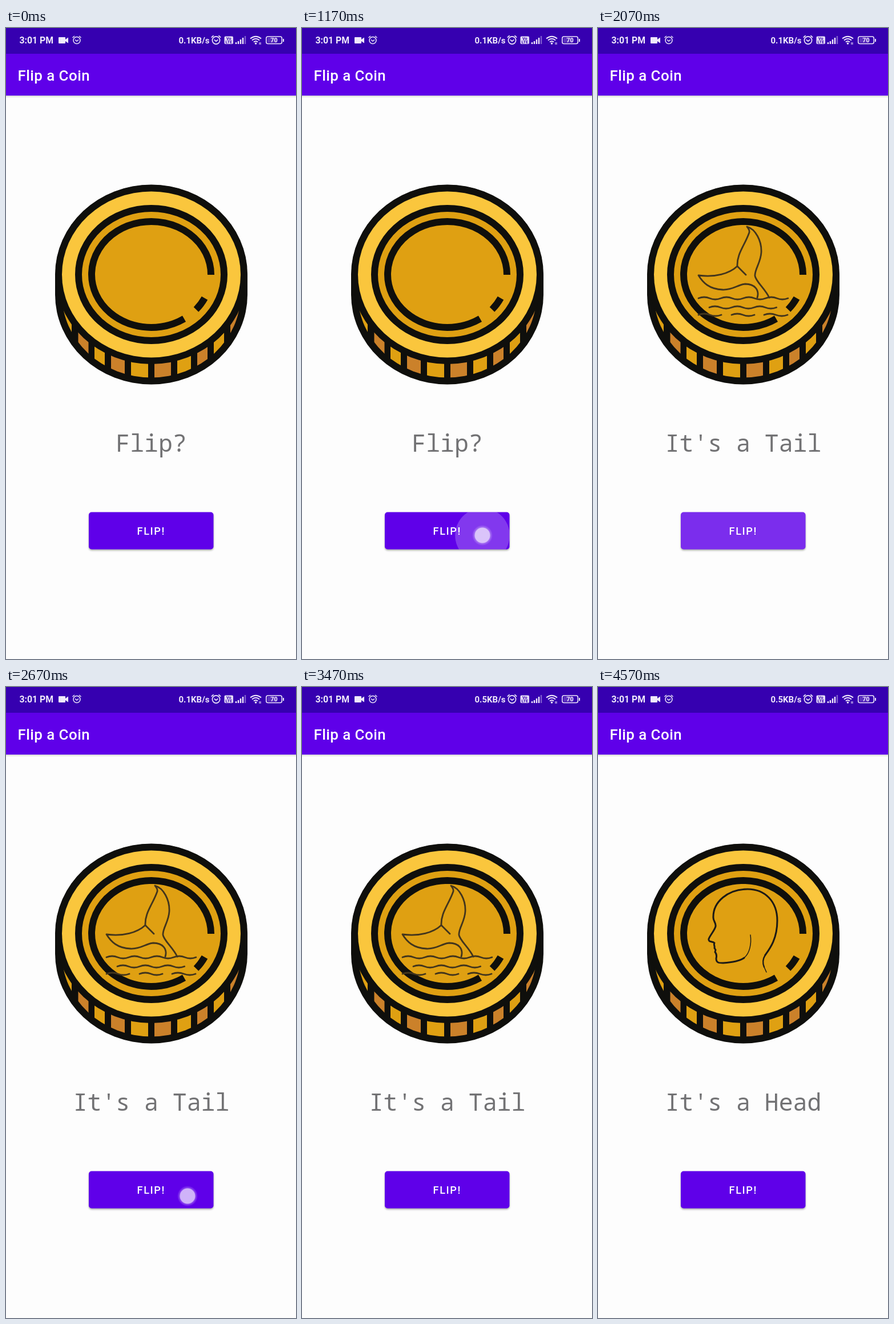
An HTML page that plays this animation: 508 by 1102 pixels, repeating every 4610 ms.

```html
<!DOCTYPE html>
<html lang="en">
<head>
<meta charset="utf-8">
<title>Flip a Coin</title>
<style>
  html, body { margin: 0; width: 100%; height: 100%; overflow: hidden; background: #fdfdfd; }
  svg { display: block; width: 100%; height: 100%; }
  text { font-family: Roboto, sans-serif; fill: #fff; }
  .status { fill: #f0eafb; font-weight: 700; }
  .line { fill: none; stroke: #f0eafb; }
  .ink { fill: none; stroke: #0f0f0c; stroke-width: 12; }
  .art { fill: none; stroke-linecap: round; stroke-linejoin: round; }
  #result { font: 41.47px "Noto Sans Mono", monospace; fill: #727274; text-anchor: middle; }
  #button { filter: drop-shadow(0 2px 1.5px rgba(0, 0, 0, .32)); }
</style>
</head>
<body>
<svg viewBox="0 0 508 1102">
  <defs>
    <clipPath id="edgeClip"><ellipse cx="254.5" cy="465.5" rx="156.5" ry="145"/></clipPath>
    <clipPath id="buttonClip"><rect x="145" y="845.5" width="218.5" height="65" rx="5"/></clipPath>
    <linearGradient id="barShadow" x2="0" y2="1">
      <stop stop-color="#000" stop-opacity=".16"/><stop offset="1" stop-color="#000" stop-opacity="0"/>
    </linearGradient>
    <radialGradient id="glow">
      <stop offset=".68" stop-color="#fff" stop-opacity=".4"/><stop offset="1" stop-color="#fff" stop-opacity="0"/>
    </radialGradient>
    <g id="alarm" class="line" stroke-width="1.5">
      <circle r="6"/>
      <path d="M-3-1 0 1.5 3-1M-7.500-4.500-4-7.500M7.500-4.500 4-7.500"/>
    </g>
  </defs>

  <rect width="508" height="1102" fill="#fdfdfd"/>
  <rect width="508" height="46" fill="#3600b0"/>
  <rect y="45" width="508" height="73" fill="#5f00e9"/>
  <rect y="118" width="508" height="4" fill="url(#barShadow)"/>
  <text x="20.500" y="91.500" font-size="25.900" font-weight="500" letter-spacing=".45">Flip a Coin</text>

  <!-- status bar -->
  <text class="status" x="23.500" y="27.300" font-size="15.800">3:01 PM</text>
  <text class="status" id="speed" x="302.500" y="27.300" font-size="15"></text>
  <path fill="#f0eafb" d="M93 16h10q1 0 1 1v3l5-3.500v10l-5-3.500v3q0 1-1 1H93q-1 0-1-1v-9q0-1 1-1z"/>
  <use href="#alarm" x="124" y="21.500"/>
  <use href="#alarm" x="368" y="21.500" transform="translate(-36.800 -2.150) scale(1.100)"/>
  <rect x="382.500" y="14.500" width="15.500" height="13.500" rx="2" fill="#e4dcf6"/>
  <g font-size="7" font-weight="700" text-anchor="middle">
    <text x="390.200" y="20.800" style="fill:#3600b0">Vo</text>
    <text x="390.200" y="27.200" style="fill:#3600b0">LTE</text>
  </g>
  <path class="line" stroke-width="2.400" d="M403 28v-3M407 28v-5M411 28v-8M415 28v-11"/>
  <path class="line" stroke-width="2.400" opacity=".4" d="M419 28V14"/>
  <path class="line" stroke-width="2" d="M428 18.500Q437.500 11 447 18.500M431 21.500Q437.500 16 444 21.500M434 24.500Q437.500 21.500 441 24.500"/>
  <circle cx="437.500" cy="27" r="1.800" fill="#f0eafb"/>
  <path class="line" stroke-width="1" d="M444 25v4M446 25v4"/>
  <rect class="line" stroke-width="1.600" x="455.800" y="15" width="27.500" height="12.500" rx="3"/>
  <rect x="458" y="17" width="16" height="8.500" fill="#fff" opacity=".2"/>
  <path class="line" stroke-width="2" d="M486 19v5"/>
  <text class="status" x="469.500" y="25.200" font-size="11" text-anchor="middle">70</text>

  <!-- coin -->
  <path fill="#0f0f0c" d="M86 430.500a168.500 157 0 0 1 337 0v35a168.500 157 0 0 1-337 0z"/>
  <g id="cells" clip-path="url(#edgeClip)"></g>
  <ellipse cx="254.500" cy="430.500" rx="168" ry="156.500" fill="#0f0f0c"/>
  <ellipse cx="254.500" cy="430.500" rx="156.500" ry="145" fill="#fac63d"/>
  <ellipse class="ink" cx="254.500" cy="430.500" rx="127.500" ry="115.500" style="fill:#dfa012"/>
  <path class="ink" d="M359 431A104.500 92.500 0 1 0 312 507.700M333 491.600A104.500 92.500 0 0 0 348 471.800"/>

  <g id="head" class="art" stroke="#1c1a16" stroke-width="3">
    <path d="M293 468C301 457 314 440 314 408C314 374 292 353 262 353C228 353 201 375 202 403C202 409 207 412 206 418C205 424 196 434 194 440C193 446 201 444 204 447C202 450 205 452 204 456L206 459L205 463C208 466 208 470 207 474C207 482 212 482 219 482C236 481 248 479 256 473"/>
    <path stroke-width="2.400" d="M293 468C288 476 288 482 291 489"/>
    <path stroke-width="1.500" d="M291 489L295 498M256 473C266 465 269 448 267 433"/>
  </g>
  <g id="tail" class="art" stroke="#42351d" stroke-width="2.800">
    <path d="M259 431L244 416C243 394 257 380 265 357C266 352 263 350 261 347C276 351 287 372 286 392C285 410 274 422 275 433C276 442 293 456 300 471"/>
    <path d="M244 416C230 429 205 436 176 432C184 445 195 456 218 457C236 458 245 448 258 447C275 447 283 458 279 471"/>
    <path d="M176 472q10-4 19.600 0t19.600 0 19.600 0 19.600 0 19.600 0 19.600 0 19.600 0 19.600 0M195 488q10-4 19.600 0t19.600 0 19.600 0 19.600 0 19.600 0 19.600 0M176 501q10-4 20 0t20 0M234 501q10-4 20 0t20 0M291 501q10-4 20.500 0t20.500 0"/>
  </g>

  <text id="result" x="254.500" y="740"></text>

  <rect id="button" x="145" y="845.500" width="218.500" height="65" rx="5" fill="#5f00e9"/>
  <g clip-path="url(#buttonClip)"><circle id="ripple" fill="#fff"/></g>
  <text x="229.600" y="885.300" font-size="18.140" font-weight="500" letter-spacing="1.620">FLIP!</text>
  <g id="touch">
    <circle r="18" fill="url(#glow)"/>
    <circle r="13.500" fill="#fff" opacity=".5"/>
  </g>
</svg>

<script>
const LOOP = 4610, RELEASE = 110, FLIP_DELAY = 130;
const taps = [
  { at: 1100, x: 316, y: 886, side: 'Head' },
  { at: 1830, x: 316, y: 886, side: 'Tail' },
  { at: 2640, x: 318, y: 889, side: 'Tail' },
  { at: 3730, x: 313, y: 883, side: 'Head' },
];
const $ = id => document.getElementById(id);
const ramp = (t, from, to) => Math.min(1, Math.max(0, (t - from) / (to - from)));
const setText = (id, value) => { if ($(id).textContent !== value) $(id).textContent = value; };
const show = (id, visible) => $(id).setAttribute('visibility', visible ? 'visible' : 'hidden');

const cells = [[97, 115], [126.5, 144.5], [155, 173], [184, 208], [219, 249],
  [260, 289], [300, 324], [335, 353], [364, 382], [393, 412]];
$('cells').innerHTML = cells.map(([left, right], i) =>
  `<rect x="${left}" y="430" width="${right - left}" height="190" fill="${i % 2 ? '#cb812a' : '#dfa012'}"/>`).join('');

function drawTap(tap, t) {
  const age = tap ? t - tap.at : Infinity;
  const press = ramp(age, -1, 20) * (1 - ramp(age, RELEASE, RELEASE + 90));
  $('touch').setAttribute('opacity', press);
  $('ripple').setAttribute('opacity', 0.22 * (1 - ramp(age, 200, 400)));
  if (!tap) return;
  $('touch').setAttribute('transform', `translate(${tap.x} ${tap.y})`);
  $('ripple').setAttribute('cx', tap.x);
  $('ripple').setAttribute('cy', tap.y);
  $('ripple').setAttribute('r', 185 * ramp(age, 40, 160));
}

function draw(now) {
  const t = now % LOOP;
  const side = taps.filter(tap => t >= tap.at + FLIP_DELAY).pop()?.side;
  show('head', side === 'Head');
  show('tail', side === 'Tail');
  setText('result', side ? `It's a ${side}` : 'Flip?');
  setText('speed', t < 3000 ? '0.1KB/s' : '0.5KB/s');
  drawTap(taps.filter(tap => t >= tap.at).pop(), t);
}

const start = performance.now();
function tick() {
  draw(performance.now() - start);
  requestAnimationFrame(tick);
}
tick();
</script>
</body>
</html>
```
